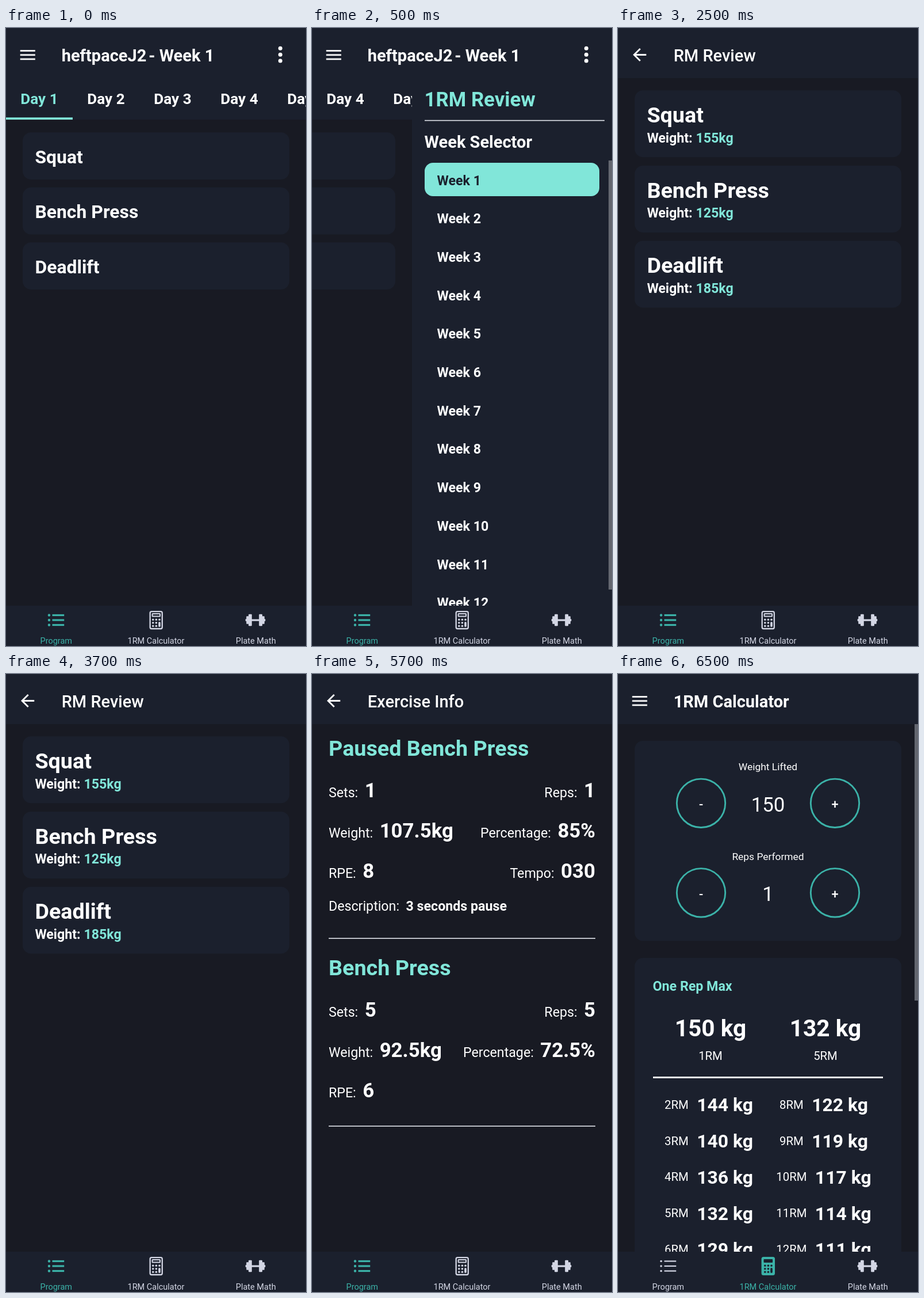
These frames come from a looping animation (522x1073 px, 8000 ms). An HTML page with a canvas:

```html
<!DOCTYPE html>
<html lang="en">
<head>
<meta charset="utf-8">
<title>Training app</title>
<style>
html, body { margin: 0; width: 100%; height: 100%; overflow: hidden; background: #171923; }
canvas { display: block; width: 522px; height: 1073px; }
</style>
</head>
<body>
<canvas id="stage"></canvas>
<script>
const W = 522, H = 1073, LOOP = 8000;
const BG = '#181a23', PANEL = '#1b202d', WHITE = '#ffffff', RULE = '#e2e5ec';
const MINT = '#81e6d9', TEAL = '#3bb2a8', PALE = '#d3d6e4', BAR = '#63666f';
const BAR_TOP = 1003;

const canvas = document.getElementById('stage');
const ctx = canvas.getContext('2d');
const dpr = window.devicePixelRatio || 1;
canvas.width = W * dpr;
canvas.height = H * dpr;
ctx.scale(dpr, dpr);

// ---- helpers ----
function rect(x, y, w, h, color) {
  ctx.fillStyle = color;
  ctx.fillRect(x, y, w, h);
}

function roundPath(x, y, w, h, r) {
  ctx.beginPath();
  ctx.roundRect(x, y, w, h, r);
}

function card(x, y, w, h, color = PANEL, r = 14.5) {
  roundPath(x, y, w, h, r);
  ctx.fillStyle = color;
  ctx.fill();
}

function dot(x, y, r, color) {
  ctx.beginPath();
  ctx.arc(x, y, r, 0, Math.PI * 2);
  ctx.fillStyle = color;
  ctx.fill();
}

function setFont(size, weight) {
  ctx.font = `${weight} ${size}px Roboto, sans-serif`;
}

function widthOf(str, size, weight) {
  setFont(size, weight);
  return ctx.measureText(str).width;
}

// y is the middle of the capital letters
function text(str, x, y, size, { weight = 700, color = WHITE, align = 'left' } = {}) {
  setFont(size, weight);
  ctx.fillStyle = color;
  ctx.textAlign = align;
  ctx.textBaseline = 'alphabetic';
  ctx.fillText(str, x, y + size * 0.3555);
}

function clipped(x, y, w, h, draw) {
  ctx.save();
  ctx.beginPath();
  ctx.rect(x, y, w, h);
  ctx.clip();
  draw();
  ctx.restore();
}

// ---- header ----
function menuIcon() {
  for (let i = 0; i < 3; i++) rect(24.7, 38.2 + i * 7.25, 26.1, 2.7, WHITE);
}

function moreIcon() {
  for (let i = 0; i < 3; i++) dot(477.3, 35.3 + i * 10.9, 3.5, WHITE);
}

const arrow = new Path2D('M20 11H7.83l5.59-5.59L12 4l-8 8 8 8 1.41-1.41L7.83 13H20z');
function backIcon() {
  ctx.save();
  ctx.translate(20.2, 29.1);
  ctx.scale(1.45, 1.45);
  ctx.fillStyle = WHITE;
  ctx.fill(arrow);
  ctx.restore();
}

function header(title, icon, weight) {
  rect(0, 0, W, 87, PANEL);
  icon();
  text(title, 96.7, 48, 29, { weight });
}

// ---- bottom bar ----
function listIcon(active) {
  const color = active ? TEAL : PALE, t = active ? 3.2 : 2.2;
  for (let i = 0; i < 3; i++) {
    const y = 1019.5 + i * 8.5;
    dot(75, y, active ? 2.2 : 1.8, color);
    rect(80.5, y - t / 2, 20.7, t, color);
  }
}

function calcIcon(active) {
  const ink = active ? PANEL : PALE;
  if (active) {
    card(249.6, 1012, 23.4, 32, TEAL, 3.5);
    card(253.5, 1016, 15.6, 6, ink, 1);
  } else {
    ctx.strokeStyle = PALE;
    ctx.lineWidth = 2.3;
    roundPath(250.7, 1013.2, 21.1, 29.8, 2.5);
    ctx.stroke();
    ctx.lineWidth = 2;
    roundPath(254.6, 1017, 13.4, 4.6, 0.5);
    ctx.stroke();
  }
  for (let row = 0; row < 3; row++)
    for (let col = 0; col < 3; col++)
      if (col < 2 || row < 1) dot(255.8 + col * 5.6, 1027.2 + row * 5.5, 1.8, ink);
  card(265.2, 1031, 3.6, 9, ink, 1.8);
}

function dumbbellIcon() {
  rect(427, 1026.5, 14, 3.2, PALE);
  for (const side of [-1, 1]) {
    const plate = (near, w, h, r) =>
      card(434 + (side > 0 ? near : -near - w), 1028 - h / 2, w, h, PALE, r);
    plate(6.2, 5.8, 20.5, 1.2);
    plate(11.5, 4.3, 13.5, 1);
    plate(15, 2.3, 4, 0.8);
  }
}

function bottomBar(active) {
  rect(0, BAR_TOP, W, H - BAR_TOP, PANEL);
  listIcon(active === 0);
  calcIcon(active === 1);
  dumbbellIcon();
  ['Program', '1RM Calculator', 'Plate Math'].forEach((name, i) =>
    text(name, 87.3 + i * 173.7, 1064, 14.5, {
      weight: 400, align: 'center', color: i === active ? TEAL : PALE
    }));
}

// ---- screens ----
const LIFTS = ['Squat', 'Bench Press', 'Deadlift'];

function programHeader() {
  header('heftpaceJ2', menuIcon, 700);
  text('- Week 1', 362.3, 48, 29, { align: 'right' });
  moreIcon();
}

function dayList(scroll) {
  rect(0, 87, W, 72, PANEL);
  ctx.save();
  ctx.translate(-scroll, 0);
  for (let d = 1; d <= 5; d++)
    text('Day ' + d, 58 + (d - 1) * 116, 123, 26.1, {
      align: 'center', color: d === 1 ? MINT : WHITE
    });
  rect(0, 155.3, 116, 3.8, MINT);
  LIFTS.forEach((name, i) => {
    const y = 181.3 + i * 95.5;
    card(29, y, 464, 81.7);
    text(name, 50.4, y + 42.2, 31.9);
  });
  ctx.restore();
}

function programScreen() {
  programHeader();
  dayList(0);
  bottomBar(0);
}

function drawerScreen() {
  programHeader();
  clipped(0, 87, 174, H, () => dayList(348));
  rect(174, 87, W - 174, H - 87, PANEL);
  text('1RM Review', 195.6, 124, 34.8, { color: MINT });
  rect(196, 159.8, 313, 1.6, RULE);
  text('Week Selector', 195.6, 197.3, 29);
  card(196, 234, 304, 58, MINT);
  for (let w = 1; w <= 12; w++)
    text('Week ' + w, 217.6, 264.3 + (w - 1) * 66.7, 23.2, { color: w === 1 ? PANEL : WHITE });
  rect(516, 230, 6, 745, BAR);
  bottomBar(0);
}

function reviewScreen() {
  header('RM Review', backIcon, 500);
  const kilos = [155, 125, 185], label = 'Weight: ';
  LIFTS.forEach((name, i) => {
    const y = 108.3 + i * 130.6;
    card(29, y, 464, 116);
    text(name, 50.4, y + 42.5, 37.7);
    text(label, 50.4, y + 82.3, 23.2);
    text(kilos[i] + 'kg', 50.4 + widthOf(label, 23.2, 700), y + 82.3, 23.2, { color: MINT });
  });
  bottomBar(0);
}

const GAP = 11.5;
function fact(label, value, y, right) {
  const size = 34.8;
  const x = right
    ? 493 - widthOf(value, size, 700)
    : 29 + widthOf(label, 23.2, 400) + GAP;
  text(label, right ? x - GAP : 29, y + 4.1, 23.2, { weight: 400, align: right ? 'right' : 'left' });
  text(value, x, y, size);
}

function exercise(name, y, rows) {
  text(name, 29, y, 37.7, { color: MINT });
  rows.forEach(([label, value, label2, value2], i) => {
    const ry = y + 72.3 + i * 70;
    fact(label, value, ry, false);
    if (label2) fact(label2, value2, ry, true);
  });
}

function infoScreen() {
  header('Exercise Info', backIcon, 500);
  exercise('Paused Bench Press', 129, [
    ['Sets:', '1', 'Reps:', '1'],
    ['Weight:', '107.5kg', 'Percentage:', '85%'],
    ['RPE:', '8', 'Tempo:', '030']
  ]);
  const label = 'Description:';
  text(label, 29, 403, 23.2, { weight: 400 });
  text('3 seconds pause', 29 + widthOf(label, 23.2, 400) + GAP, 403, 23.2);
  rect(29, 458.2, 464, 1.6, RULE);
  exercise('Bench Press', 510, [
    ['Sets:', '5', 'Reps:', '5'],
    ['Weight:', '92.5kg', 'Percentage:', '72.5%'],
    ['RPE:', '6']
  ]);
  rect(29, 784.2, 464, 1.6, RULE);
  bottomBar(0);
}

function stepper(title, value, y) {
  const mid = { weight: 400, align: 'center' };
  text(title, 261, y - 63.3, 17.4, mid);
  text(value, 261, y + 2, 34.8, mid);
  [['-', 144.5], ['+', 377.5]].forEach(([sign, x]) => {
    ctx.beginPath();
    ctx.arc(x, y, 42.2, 0, Math.PI * 2);
    ctx.strokeStyle = TEAL;
    ctx.lineWidth = 2.9;
    ctx.stroke();
    text(sign, x, y + 2, 21.75, { weight: 500, align: 'center' });
  });
}

function repMax(reps, kilos, x, y) {
  const label = reps + 'RM', value = kilos + ' kg', gap = 14.5;
  const lw = widthOf(label, 20.3, 400), vw = widthOf(value, 31.9, 700);
  const left = x - (lw + gap + vw) / 2;
  text(label, left, y - 0.4, 20.3, { weight: 400 });
  text(value, left + lw + gap, y, 31.9);
}

function calculatorScreen() {
  header('1RM Calculator', menuIcon, 700);
  card(29, 116, 464, 347.5);
  stepper('Weight Lifted', '150', 224.3);
  stepper('Reps Performed', '1', 379.8);
  card(29, 493, 464, 600);
  text('One Rep Max', 60.6, 541.7, 23.2, { color: MINT });
  [['150 kg', '1RM', 161], ['132 kg', '5RM', 361]].forEach(([kilos, label, x]) => {
    text(kilos, x, 614.3, 40.6, { align: 'center' });
    text(label, x, 663, 20.3, { weight: 400, align: 'center' });
  });
  rect(61, 699, 400, 2.9, WHITE);
  const left = [144, 140, 136, 132, 129], right = [122, 119, 117, 114, 111];
  left.forEach((kilos, i) => {
    const y = 748 + i * 62.75;
    repMax(i + 2, kilos, 158, y);
    repMax(i + 8, right[i], 358, y);
  });
  rect(516, 87, 6, 480, BAR);
  bottomBar(1);
}

// ---- timeline: start time and screen ----
const SCENES = [
  [0, programScreen],
  [500, drawerScreen],
  [2500, reviewScreen],
  [4500, infoScreen],
  [6500, calculatorScreen]
];

function render(time) {
  const t = time % LOOP;
  const [, draw] = SCENES.findLast(([start]) => t >= start);
  rect(0, 0, W, H, BG);
  draw();
}

const begin = performance.now();
function tick() {
  render(performance.now() - begin);
  requestAnimationFrame(tick);
}
tick();
</script>
</body>
</html>
```
